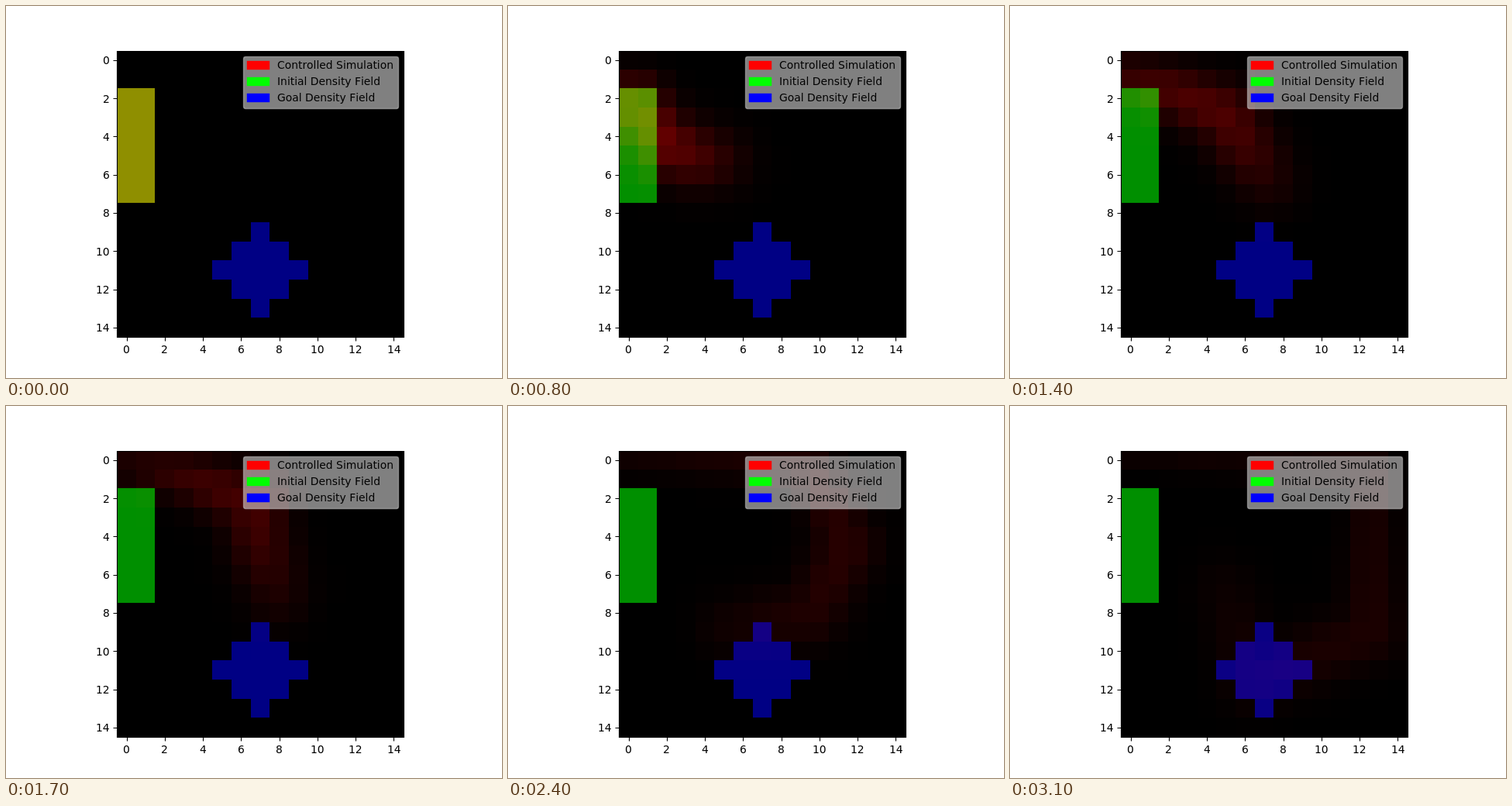
Animation, 640 px wide and 480 px high, one loop 3.3 s. Source, as an HTML page:

```html
<!DOCTYPE html>
<html lang="en">
<head>
<meta charset="utf-8">
<title>Density control</title>
<style>
  html, body { margin: 0; width: 100%; height: 100%; overflow: hidden; background: #fff; }
  svg { display: block; width: 640px; height: 480px; }
  text { font: 13.89px "DejaVu Sans", sans-serif; font-kerning: none; }
  .crisp { shape-rendering: crispEdges; }
</style>
</head>
<body>
<svg id="stage" viewBox="0 0 640 480">
  <rect class="crisp" x="143" y="58" width="371" height="370"/>
  <g id="cells" class="crisp"></g>
  <path d="M143.5 58V428M143 58.5H514M513.5 58V428M143 427.5H514" fill="none" stroke="#000" stroke-width="1.11"/>
  <g id="axes"></g>
  <g id="legend" stroke-width="1.39">
    <rect x="306.5" y="65.5" width="200" height="67" rx="2.8" fill="#fff" fill-opacity=".5" stroke="#ccc" stroke-opacity=".5"/>
  </g>
</svg>
<script>
const LOOP = 3300, STEP = 100, N = 15, CELL = 24.64, DIGIT = 8.84;
const INITIAL = 143, MASS = INITIAL * 12, GOAL = Math.round(MASS / 13);
const HELD = [2500, 2700, 3200]; // steps at which the picture stays as it was

// The controlled density is a soft ridge along a line, from its tail to its head.
const POSES = [
  { at: 500, line: [[.5, 2.8], [.5, 4], [.5, 5.2], [1.5, 5.2], [2.8, 5.1]] },
  { at: 1000, line: [[.3, 2.2], [1.2, 2.8], [2.8, 3.8], [4.8, 5], [6.2, 5.3]] },
  { at: 1700, line: [[0, .2], [3.2, .9], [6.6, 2.2], [7, 4.2], [7.9, 7]] },
  { at: 2400, line: [[0, -.2], [9.4, .2], [11.5, 4.5], [9.6, 8], [5.2, 8.7]] },
  { at: 3100, line: [[0, -.2], [12.6, .4], [12.6, 9], [6.5, 11.5], [4.9, 6.7]] }
];
const START = POSES[0].at;

const mix = (a, b, k) => a + (b - a) * k;
const mixPoint = (a, b, k) => a.map((v, i) => mix(v, b[i], k));
const clamp = v => Math.min(1, Math.max(0, v));
const edgeX = col => Math.round(143.2 + col * CELL);
const edgeY = row => Math.round(57.2 + row * CELL);

function add(parent, tag, attrs, label) {
  const el = document.createElementNS("http://www.w3.org/2000/svg", tag);
  for (const name in attrs) el.setAttribute(name, attrs[name]);
  if (label !== undefined) el.textContent = label;
  return document.getElementById(parent).appendChild(el);
}

const inStart = (x, y) => x < 2 && y > 1 && y < 8;
function inGoal(x, y) {
  const dx = Math.abs(x - 7), dy = Math.abs(y - 11);
  return dx + dy <= 2;
}

const cells = [];
for (let y = 0; y < N; y++) {
  for (let x = 0; x < N; x++) {
    const left = edgeX(x), top = Math.max(58, edgeY(y));
    const el = add("cells", "rect", {
      x: left, y: top, width: edgeX(x + 1) - left, height: edgeY(y + 1) - top
    });
    cells.push({ x, y, el });
  }
}

for (let i = 0; i < N; i += 2) {
  const x = 143.2 + (i + .5) * CELL, y = 57.6 + (i + .5) * CELL;
  const width = DIGIT * String(i).length;
  add("axes", "path", {
    d: `M${Math.round(x) + .5} 428v4.5M143 ${Math.round(y) + .5}h-4.5`, stroke: "#000", "stroke-width": 1.11
  });
  add("axes", "text", { x: Math.round(x - width / 2), y: 448 }, i);
  add("axes", "text", { x: Math.round(133.5 - width), y: Math.round(y + 5.3) }, i);
}

[["#f00", "Controlled Simulation"], ["#0f0", "Initial Density Field"], ["#00f", "Goal Density Field"]]
  .forEach(([color, label], i) => {
    add("legend", "rect", { x: 311.5, y: 71.5 + 21 * i, width: 28, height: 10, fill: color, stroke: color });
    add("legend", "text", { x: 350, y: 81 + 21 * i }, label);
  });

function lineAt(t) {
  const next = Math.max(1, POSES.findIndex(pose => t <= pose.at));
  const a = POSES[next - 1], b = POSES[next];
  const k = clamp((t - a.at) / (b.at - a.at));
  return a.line.map((point, i) => mixPoint(point, b.line[i], k));
}

// The mass is constant: a longer ridge is a fainter one.
function ridgeAt(t) {
  const line = lineAt(t), last = line.length - 1, samples = 16;
  const length = line.slice(1).reduce((sum, [x, y], i) => sum + Math.hypot(x - line[i][0], y - line[i][1]), 0);
  const strength = MASS / (2.63 * (length + 2.63));
  const late = clamp((t - 1000) / 700);
  const tailWidth = 1.2 - t / 5000;
  const ridge = [];
  for (let s = 0; s <= last * samples; s++) {
    const n = Math.min(last - 1, Math.floor(s / samples));
    const [x, y] = mixPoint(line[n], line[n + 1], s / samples - n);
    const u = s / (last * samples);
    const profile = mix(1.5 - 1.1 * u * u, .6 + .9 * Math.sin(Math.PI * u), late);
    const width = mix(tailWidth, 1.15, clamp(2 * u) ** 2);
    ridge.push({ x, y, width, height: strength * profile });
  }
  return ridge;
}

const density = (ridge, x, y) => Math.max(...ridge.map(p =>
  p.height * Math.exp(-((x - p.x) ** 2 + (y - p.y) ** 2) / (2 * p.width ** 2))));

function draw(t) {
  const ridge = ridgeAt(t), spread = clamp(t / START);
  for (const { x, y, el } of cells) {
    const start = inStart(x, y) ? INITIAL : 0;
    const red = Math.round(mix(start, density(ridge, x, y), spread));
    el.setAttribute("fill", `rgb(${red},${start},${inGoal(x, y) ? GOAL : 0})`);
  }
}

let shown = -1;
const begin = performance.now();
function tick(now) {
  let t = Math.floor((Math.max(0, now - begin) % LOOP) / STEP) * STEP;
  if (HELD.includes(t)) t -= STEP;
  if (t !== shown) draw(shown = t);
  requestAnimationFrame(tick);
}
tick(begin);
</script>
</body>
</html>
```
